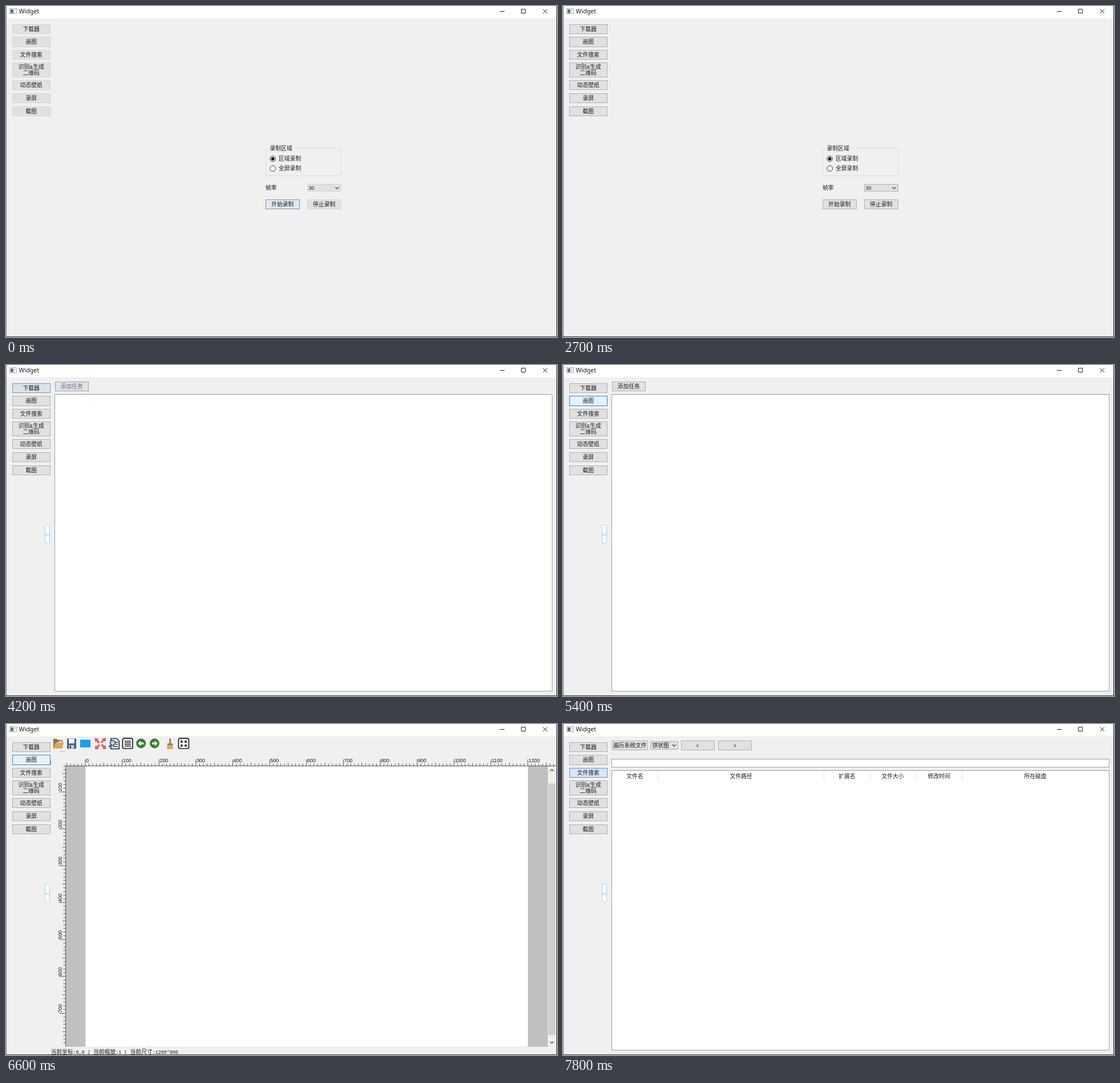
An HTML page for the animation above (8000 ms loop, 966 by 580 pixels).

```html
<!DOCTYPE html>
<html lang="zh-CN">
<head>
<meta charset="utf-8">
<title>Widget</title>
<style>
html, body { margin: 0; width: 100%; height: 100%; overflow: hidden; background: #f0f0f0; }
svg { display: block; width: 966px; height: 580px; }
text { font: 9.8px "Noto Sans CJK SC", "Noto Sans CJK", sans-serif; fill: #1a1a1a; white-space: pre; }
.num { font: 8.9px "Liberation Sans", sans-serif; }
.mono { font: 8.3px "Liberation Mono", monospace; }
.title { font: 10.7px "Noto Sans", "Open Sans", sans-serif; }
.mid { text-anchor: middle; }
.btn rect { fill: #e1e1e1; stroke: var(--line); }
.field { fill: #fff; stroke: #9b9da1; }
.thin { fill: none; stroke: #222; }

svg, .page, .btn rect, .btn text, #badge { animation: 8s step-end infinite; }
svg { animation-name: tone; }
#badge { animation-name: badge; }
#record { animation-name: record; }
#download { animation-name: download; }
#paint { animation-name: paint; }
#files { animation-name: files; }
#handle { animation-name: handle; }
#start rect { animation-name: start; }
#add rect { animation-name: add; }
#add text { animation-name: addText; }
#nav0 rect { animation-name: nav0; }
#nav1 rect { animation-name: nav1; }
#nav2 rect { animation-name: nav2; }

@keyframes tone {
  0% { --line: #d4d4d4; }
  3.75%, 100% { --line: #b0b0b0; }
}
@keyframes badge {
  0% { fill: #666; }
  3.75% { fill: #4c7f70; }
  52.5% { fill: #66707c; }
  56.25% { fill: #4c7f70; }
  71.25% { fill: #64706c; }
  75% { fill: #4a7f8c; }
  97.5%, 100% { fill: #666; }
}
@keyframes record { 0% { visibility: visible; } 52.5%, 100% { visibility: hidden; } }
@keyframes download { 0% { visibility: hidden; } 52.5% { visibility: visible; } 71.25%, 100% { visibility: hidden; } }
@keyframes paint {
  0% { visibility: hidden; }
  71.25% { visibility: visible; --gold: #d9996a; --red: #dc8a62; --blue: #48a4e0; --green: #486c4c; }
  75% { visibility: visible; --gold: #dcab52; --red: #ea5353; --blue: #159df3; --green: #397d35; }
  97.5%, 100% { visibility: hidden; }
}
@keyframes files { 0% { visibility: hidden; } 97.5%, 100% { visibility: visible; } }
@keyframes handle { 0% { visibility: hidden; } 52.5%, 100% { visibility: visible; } }
@keyframes start {
  0% { fill: #e2ebf4; stroke: #8093a6; }
  7.5%, 100% { fill: #e1e1e1; stroke: #b0b0b0; }
}
@keyframes add {
  0% { fill: #dfe4ec; stroke: #97a5b5; }
  56.25%, 100% { fill: #e1e1e1; stroke: #b0b0b0; }
}
@keyframes addText { 0% { fill: #6c6c6c; } 56.25%, 100% { fill: #1a1a1a; } }
@keyframes nav0 {
  0% { fill: #e1e1e1; stroke: var(--line); }
  48.75% { fill: #e5f1fb; stroke: #2a86d8; }
  52.5% { fill: #dae3ec; stroke: #8295a9; }
  56.25% { fill: #e5f1fb; stroke: #2a86d8; }
  63.75%, 100% { fill: #e1e1e1; stroke: #b0b0b0; }
}
@keyframes nav1 {
  0% { fill: #e1e1e1; stroke: var(--line); }
  67.5% { fill: #e5f1fb; stroke: #2a86d8; }
  71.25% { fill: #d3e6f4; stroke: #457fa8; }
  75% { fill: #e5f1fb; stroke: #2a86d8; }
  90%, 100% { fill: #e1e1e1; stroke: #b0b0b0; }
}
@keyframes nav2 {
  0% { fill: #e1e1e1; stroke: var(--line); }
  93.75% { fill: #e5f0fa; stroke: #4a8cc6; }
  97.5%, 100% { fill: #d9e6f3; stroke: #5f93bd; }
}
</style>
</head>
<body>
<svg id="stage" viewBox="0 0 966 580"></svg>
<script>
const text = (x, y, s, cls = '') => `<text x="${x}" y="${y + 3.6}" class="${cls}">${s}</text>`;
const mid = (x, y, s) => text(x, y, s, 'mid');
const num = (x, y, s, cls = 'num') => `<text x="${x}" y="${y + 3}" class="${cls}">${s}</text>`;
const rect = (x, y, w, h, attrs) => `<rect x="${x}" y="${y}" width="${w}" height="${h}" ${attrs}/>`;
const path = (d, attrs = 'class="thin"') => `<path d="${d}" ${attrs}/>`;
const group = (id, body, cls = 'page') => `<g id="${id}" class="${cls}">${body}</g>`;
const chevron = (x, y, dir = 1) =>
  path(`M${x - 3} ${y - 1.5 * dir}l3 ${3 * dir}l3 ${-3 * dir}`, 'fill="none" stroke="#3a3a3a" stroke-width="1.1"');

function button(id, x, y, w, h, ...lines) {
  const cy = y + h / 2 - 5.5 * (lines.length - 1);
  return group(id, rect(x + .5, y + .5, w, h, '') +
    lines.map((s, i) => mid(x + w / 2 + .2, cy + 11 * i + .3, s)).join(''), 'btn');
}

const frame = () =>
  rect(0, 0, 966, 580, 'fill="#f0f0f0"') + rect(0, 0, 966, 21.5, 'fill="#fff"') +
  rect(6.5, 4.5, 12, 9, 'fill="#fff" stroke="#a5a5a5"') +
  rect(8, 6, 5, 6.5, 'id="badge"') + path('M15.5 6v4', 'stroke="#999"') +
  text(22.5, 9.5, 'Widget', 'title') +
  path('M866 9.5h8M903.5 5.5h7v7h-7zM941.5 5.5l7.5 7.5m0-7.5l-7.5 7.5');

const nav = () => [
  [32, 16, '下载器'], [54, 17, '画图'], [77, 16, '文件搜索'],
  [99, 25, '识别<tspan class="num">&amp;</tspan>生成', '二维码'],
  [130, 16, '动态壁纸'], [153, 16, '录屏'], [176, 16, '截图']
].map(([y, h, ...s], i) => button('nav' + i, 11, y, 66, h, ...s)).join('');

const radio = (y, s) => `<circle cx="467.7" cy="${y}" r="4.9" fill="#fff" stroke="#333"/>` + text(478, y, s);

const record = () =>
  path('M460 249.5H455.5V297.5H587.5V249.5H504', 'fill="none" stroke="#dcdcdc"') +
  text(462.5, 249, '录制区域') + radio(267.7, '区域录制') + radio(284.7, '全屏录制') +
  '<circle cx="467.7" cy="267.7" r="3" fill="#111"/>' +
  text(455, 318.3, '帧率') +
  button('rate', 528, 312, 59, 12) + num(530.5, 319, '30') + chevron(580.5, 319) +
  button('start', 455, 339, 59, 16, '开始录制') + button('stop', 528, 339, 59, 16, '停止录制');

const download = () =>
  button('add', 86, 29, 58, 16, '添加任务') + rect(85.5, 51.5, 872, 520, 'class="field"');

function rulers() {
  const step = 6.465;
  let d = '', labels = '';
  const size = i => i % 10 === 0 ? -11 : i % 5 ? -3.5 : -5;
  for (let i = -5; i <= 127; i++) {
    const x = 139 + i * step;
    d += `M${x.toFixed(1)} 73v${size(i)}`;
    if (i % 10 === 0) labels += num(x + 1.2, 64, i * 10);
  }
  for (let i = 3; i <= 78; i++) {
    const y = 54.3 + i * step;
    d += `M104 ${y.toFixed(1)}h${size(i)}`;
    if (i % 10 === 0) labels += `<g transform="translate(94.7 ${y - 1}) rotate(-90)">${num(0, 0, i * 10)}</g>`;
  }
  return path(d, 'stroke="#444" stroke-width=".9"') + labels;
}

function icons() {
  const arrow = '<path d="M-9.5-9.5l6 1-1.7 1.8 4 4-2.1 2.1-4-4-1.8 1.7z" fill="var(--red)" stroke="#b55" stroke-width=".4"/>';
  const disc = (x, dir) => `<g transform="translate(${x} 34) scale(${dir} 1)"><circle r="8.4" fill="var(--green)"/>` +
    path('M-5.5 0l5-4.8v3h5v3.6h-5v3z', 'fill="#fff"') + '</g>';
  const box = (x, w) => rect(x, 25.2, w, 17.8, 'rx="3" fill="#fff" stroke="#161a20" stroke-width="1.7"');
  return path('M83 43V26h6l2 2h8v4', 'fill="#8a7457"') + path('M86 34l11-5 2 5z', 'fill="#f3ece2"') +
    path('M83 43l3-9 15-3-2 12z', 'fill="var(--gold)"') +
    rect(107, 25.5, 16, 18, 'rx="1" fill="#49637f"') + rect(110, 26, 10, 8, 'fill="#f2f5f7"') +
    rect(110, 37, 9, 6.5, 'fill="#c7cfd6"') + rect(111.5, 38, 2.5, 4.5, 'fill="#344759"') +
    rect(130, 27.5, 18, 13.5, 'fill="var(--blue)"') +
    [0, 90, 180, 270].map(a => `<g transform="translate(165.5 34.5) rotate(${a})">${arrow}</g>`).join('') +
    path('M184 25.5h10l4.2 4V43.5H184z', 'fill="#fff" stroke="#1b2028" stroke-width="1.6"') +
    path('M192 32h4M192 35.5h4M187 39.5h9', 'stroke="#222" stroke-width="1.4"') +
    '<circle cx="187" cy="33" r="4.3" fill="#b9dcf5" stroke="#28527c" stroke-width="1.8"/>' +
    path('M184 36.5l-3.5 4', 'stroke="#28527c" stroke-width="2.2"') +
    box(204.5, 17.5) + path('M208 30h11M208 33h11M208 36h11M208 39h11', 'stroke="#222" stroke-width="1.3"') +
    disc(236.7, 1) + disc(260.5, -1) +
    rect(286, 25, 3.2, 10, 'rx="1.4" fill="#a98160"') + rect(283, 34, 9.5, 3.5, 'fill="#8b8278"') +
    path('M283 37h9.5l.5 7h-11z', 'fill="var(--gold)"') +
    box(302.5, 18) +
    [[306, 29], [313, 29], [306, 36], [313, 36]].map(([x, y]) => rect(x, y, 3.8, 3.8, 'rx="1" fill="#161a20"')).join('');
}

const status = () => [
  [78.5, '当前坐标', ':0,0 |'], [153, '当前缩放', ':1 |'], [217.5, '当前尺寸', ':1200*800']
].map(([x, label, value]) => text(x, 574.5, label) + num(x + 39.4, 574.8, value, 'mono')).join('');

const paint = () =>
  icons() + path('M94 47.5h10', 'stroke="#bbb"') + path('M78.5 64v8', 'stroke="var(--red)" stroke-opacity=".7"') +
  rect(104, 73, 846, 492.5, 'fill="#c0c0c0"') + rect(139.5, 73, 775.5, 492.5, 'fill="#fff"') +
  rulers() + path('M104.5 565V73.5H964', 'fill="none" stroke="#555"') +
  rect(951, 104, 12.5, 441, 'fill="#cdcdcd"') + chevron(957, 81, -1) + chevron(957, 558) +
  status();

const files = () =>
  button('scan', 86, 29, 62, 16, '遍历系统文件') +
  button('chart', 153, 30, 48, 14) + text(156.5, 37.3, '饼状图') + chevron(194.7, 37.5) +
  button('prev', 207, 29, 58, 16) + button('next', 272, 29, 58, 16) +
  path('M237.7 35.3l-3.5 2.7 3.5 2.7M299.5 35.3l3.5 2.7-3.5 2.7') +
  rect(85.5, 61.5, 872, 14, 'class="field"') + rect(85.5, 81.5, 872, 490, 'class="field"') +
  [166, 457, 538, 618, 699].map(x => path(`M${x}.5 82v19`, 'stroke="#e2e2e2"')).join('') +
  [[126, '文件名'], [312, '文件路径'], [498, '扩展名'], [578, '文件大小'], [659, '修改时间'], [828, '所在磁盘']]
    .map(([x, s]) => mid(x, 91.5, s)).join('');

const handle = () =>
  rect(68.5, 280.5, 8, 32, 'rx="3" fill="#fff" stroke="#9dd5f6"') +
  path('M69 296.5h7M69 298.5h7', 'stroke="#9dd5f6" stroke-width=".9"');

const edges = () =>
  rect(0, 0, 1, 580, 'fill="#777"') + rect(965, 0, 1, 580, 'fill="#2b2b2b"') +
  rect(0, 579, 966, 1, 'fill="#3a3a3a"');

document.getElementById('stage').innerHTML = frame() + nav() +
  group('record', record()) + group('download', download()) +
  group('paint', paint()) + group('files', files()) + group('handle', handle()) + edges();
</script>
</body>
</html>
```
